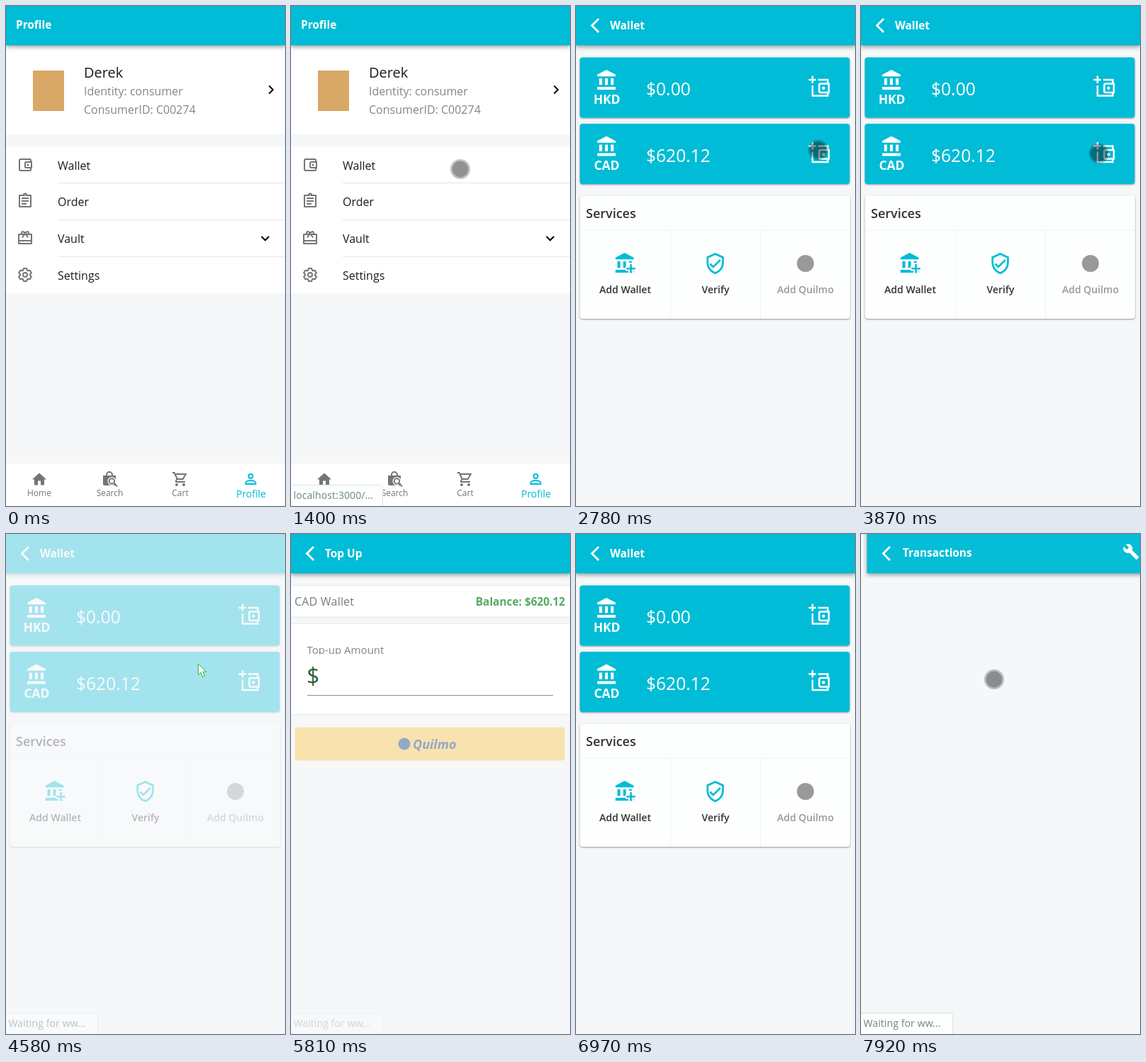
Animation of 394 by 705 pixels, one loop 7.99 s. Source, as an HTML page:

```html
<!DOCTYPE html>
<html lang="en">
<head>
<meta charset="utf-8">
<title>Wallet app</title>
<style>
  html, body { margin: 0; width: 100%; height: 100%; overflow: hidden; background: #f5f7f9; }
  svg { display: block; }
  text { font: 16px "Open Sans", "Noto Sans", sans-serif; }
  .title { font-size: 15.4px; font-weight: 700; fill: #fff; }
  .medium { font-weight: 600; fill: #333; }
  .cell { font-size: 14px; text-anchor: middle; }
  .code { font-size: 17.4px; font-weight: 700; text-anchor: middle; }
  .amount { font-size: 24.6px; }
  .tab { font-size: 12px; text-anchor: middle; }
  .bar { fill: #00bcd6; filter: drop-shadow(0 2px 3px rgba(0, 0, 0, .4)); }
  .card { filter: drop-shadow(0 1px 1px rgba(0, 0, 0, .4)); }
  .line { fill: none; stroke: currentColor; stroke-width: 2; }
  .rule { fill: none; stroke: #e4e6e8; }
  .panel { fill: #fff; stroke: #e6e9eb; }
</style>
</head>
<body>
<svg width="394" height="705">
  <defs>
    <rect id="bar" class="bar" x="-.5" y="-10" width="395" height="65.5"/>
    <g id="backBar">
      <use href="#bar"/>
      <path d="M32 18 22.5 27.5 32 37" fill="none" stroke="#fff" stroke-width="2.8"/>
    </g>
    <path id="bank" d="M4 10v7h3v-7zm6 0v7h3v-7zM2 22h19v-3H2zm14-12v7h3v-7zm-4.5-9L2 6v2h19V6z"/>
    <g id="currency" color="#fff">
      <rect class="card" x="5.5" y="72.5" width="381" height="85" rx="4" fill="#00bcd6"/>
      <use href="#bank" transform="translate(27.3 88.7) scale(1.36 1.33)" fill="#fff"/>
      <path class="line" style="stroke-width:2.5" d="M328.500 104h10.500m-5-5.500v10.500m8-5h13.500v5M334 112v14.500h21.500v-4M345.500 109.500h11.500v12.500h-11.500q-2 0-2-2v-8.500q0-2 2-2z"/>
      <circle cx="349.5" cy="115.800" r="2.200" fill="#fff"/>
    </g>
  </defs>

  <g id="profile">
    <rect y="50" width="394" height="131" fill="#fff"/>
    <rect y="198" width="394" height="207" fill="#fff"/>
    <use href="#bar"/>
    <text class="title" x="14" y="32">Profile</text>
    <rect x="38" y="91" width="44" height="57" fill="#d9a766"/>
    <text x="110" y="101" style="font-size:20px" fill="#1c1c1c">Derek</text>
    <g fill="#858585">
      <text x="110" y="126">Identity: consumer</text>
      <text x="110" y="152">ConsumerID: C00274</text>
    </g>
    <path d="m371.500 112.500 5.500 5.500-5.500 5.500M360.700 325l5.300 5.300 5.300-5.300" class="line"/>
    <path class="rule" d="M73 249.500H394M73 301.500H394M73 353.500H394"/>
    <g fill="#1c1c1c">
      <text x="73" y="231">Wallet</text>
      <text x="73" y="282">Order</text>
      <text x="73" y="334">Vault</text>
      <text x="73" y="386">Settings</text>
    </g>
    <g fill="#757575" color="#757575">
      <g transform="translate(15 212)">
        <path class="line" d="M20 7V5.500Q20 4 18.500 4h-13Q4 4 4 5.500v13Q4 20 5.500 20h13q1.500 0 1.500-1.500V17M13.500 8h7.500v8h-7.500q-1.500 0-1.500-1.500v-5Q12 8 13.500 8z"/>
        <circle cx="16" cy="12" r="1.500"/>
      </g>
      <g transform="translate(15 263)">
        <path class="line" d="M4 4h16v16H4zM7 8h10M7 12h10M7 16h7" stroke-linejoin="round"/>
        <path d="M9 5V3.500a3 3 0 0 1 6 0V5z"/>
        <circle cx="12" cy="3.500" r=".8" fill="#fff"/>
      </g>
      <path class="line" transform="translate(15 315)" stroke-linejoin="round"
        d="M3 7h18v13H3zM3 16h18M7.800 11.500 12 6l4.200 5.500M12 6C11 2.500 7 2.200 7 5q0 2 3 2M12 6c1-3.500 5-3.800 5-1q0 2-3 2"/>
      <g class="line" transform="translate(27 379)">
        <path id="gear" stroke-linejoin="round"/>
        <circle r="3"/>
      </g>
    </g>
    <rect y="645" width="394" height="60" fill="#fff"/>
    <g fill="#757575" color="#757575">
      <path transform="translate(35 655.5)" d="M10 20v-6h4v6h5v-8h3L12 3 2 12h3v8z"/>
      <g transform="translate(134 654)">
        <path d="M3 8h18v14H5q-2 0-2-2z"/>
        <path class="line" d="M8 9V7a4 4 0 0 1 8 0v2"/>
        <circle cx="15.5" cy="16" r="6" fill="#fff"/>
        <path class="line" d="m18 18.500 5 5"/>
        <circle class="line" cx="15.5" cy="16" r="3.700"/>
      </g>
      <g transform="translate(234 655)">
        <path class="line" d="M1 3h2.700l4.100 9h8l4-7H5M7.500 12 6 14.600Q5.500 16 7 16h12"/>
        <circle cx="7" cy="20" r="2"/><circle cx="17" cy="20" r="2"/>
      </g>
      <text class="tab" x="47" y="691">Home</text>
      <text class="tab" x="146.5" y="691">Search</text>
      <text class="tab" x="246" y="691">Cart</text>
    </g>
    <g color="#00bcd6" fill="#00bcd6">
      <g class="line" transform="translate(333.5 655)">
        <circle cx="12" cy="8" r="3"/>
        <path d="M5 19v-2c0-1.500 3.500-3.100 7-3.100s7 1.600 7 3.100v2z"/>
      </g>
      <text class="tab" x="346" y="693" style="font-size:14px">Profile</text>
    </g>
  </g>

  <g id="wallet">
    <use href="#backBar"/>
    <text class="title" x="48" y="32.500">Wallet</text>
    <use href="#currency"/>
    <use href="#currency" y="93.500"/>
    <g fill="#fff">
      <text class="code" x="43.500" y="138">HKD</text>
      <text class="code" x="43.500" y="231">CAD</text>
      <text class="amount" x="99" y="126">$0.00</text>
      <text class="amount" x="99" y="220">$620.12</text>
    </g>
    <rect class="card" x="5.5" y="267.5" width="381.5" height="173.5" rx="4" fill="#fdfefe"/>
    <path class="rule" d="M5 316H387M133.500 316V441M260.500 316V441" style="stroke:#eff2f4"/>
    <text class="medium" x="14" y="299" style="font-size:18px">Services</text>
    <g fill="#00bcd6" color="#00bcd6">
      <use href="#bank" transform="translate(53 346.7) scale(1.36 1.33)"/>
      <path d="M77.500 362v15M70 370h15" stroke="#fdfefe" stroke-width="7"/>
      <path d="M77.500 364v12.500M71.300 370.300h12.500" stroke="currentColor" stroke-width="2.600"/>
      <path class="line" transform="translate(180.3 346.7) scale(1.36)"
        d="M12 2.100 4 5.650V11c0 5 3.400 9.700 8 10.970 4.600-1.270 8-5.970 8-10.970V5.650zM6.700 12.300l3.300 3.300 7.300-7.300"/>
    </g>
    <circle cx="324" cy="363" r="12" fill="#999"/>
    <text class="medium cell" x="69.5" y="405">Add Wallet</text>
    <text class="medium cell" x="197" y="405">Verify</text>
    <text class="medium cell" x="324" y="405" style="fill:#999">Add Quilmo</text>
  </g>

  <g id="topUp">
    <use href="#backBar"/>
    <text class="title" x="48" y="32.500">Top Up</text>
    <rect class="panel" x="-1" y="72.5" width="396" height="44.5"/>
    <text x="5" y="101" fill="#737d7e" letter-spacing=".2">CAD Wallet</text>
    <text class="title" x="387" y="101" text-anchor="end" style="fill:#57aa60">Balance: $620.12</text>
    <rect class="panel" x="-1" y="126.5" width="396" height="128"/>
    <text x="22.500" y="169" fill="#7f8788" style="font-size:15px">Top-up Amount</text>
    <rect x="20" y="169.5" width="120" height="7" fill="#fff"/>
    <text x="22" y="212" fill="#2f6135" style="font-size:32px">$</text>
    <path d="M23 227.500H370" stroke="#8c8c8c"/>
    <g id="pay">
      <rect x="5.5" y="272.5" width="381" height="47" rx="4" fill="#f8e3af"/>
      <g fill="#92a8c8">
        <circle cx="160" cy="296" r="8.500"/>
        <text x="172" y="303" style="font-size:18px;font-weight:700;font-style:italic">Quilmo</text>
      </g>
    </g>
  </g>

  <g id="transactions">
    <use href="#backBar"/>
    <text class="title" x="50" y="32">Transactions</text>
    <path fill="#fff" transform="translate(360.5 13)" d="M22.700 19l-9.100-9.100c.9-2.300.4-5-1.500-6.900-2-2-5-2.400-7.400-1.300L9 6 6 9 1.600 4.700C.4 7.100.9 10.100 2.900 12.100c1.900 1.900 4.600 2.400 6.900 1.500l9.100 9.100c.4.4 1 .4 1.400 0l2.300-2.300c.5-.4.5-1.100.1-1.400z"/>
  </g>

  <g id="status">
    <path d="M-1 675.500H126q3.500 0 3.500 3.500V706H-1z" fill="#fdfefe" stroke="#dfe2e4"/>
    <text id="statusText" x="3.500" y="695" fill="#6f8387" style="font-size:14px" letter-spacing=".1"></text>
  </g>

  <g id="cursor">
    <g id="touch">
      <circle r="12.700" fill="none" stroke="#000" stroke-opacity=".24" stroke-width="2.600"/>
      <circle r="11.400" fill-opacity=".43"/>
    </g>
    <path id="arrow" d="M0 0V15.500L3.600 12.200 6.200 18.500 9 17.300 6.400 11.300H11z" fill="#fff" stroke="#2fb52f"/>
  </g>
</svg>
<script>
  const LOOP = 7990, WIDTH = 394;
  const $ = id => document.getElementById(id);
  const clamp = v => Math.min(1, Math.max(0, v));
  const ramp = (t, from, to) => clamp((t - from) / (to - from));

  // Six teeth, four corners each
  const corners = [];
  for (let tooth = 0; tooth < 6; tooth++)
    for (const [offset, radius] of [[-26, 6.9], [-13, 9.3], [13, 9.3], [26, 6.9]]) {
      const angle = (tooth * 60 + offset) * Math.PI / 180;
      corners.push([radius * Math.sin(angle), radius * Math.cos(angle)]);
    }
  $("gear").setAttribute("d", "M" + corners.join("L") + "z");

  // Pages slide in from the right and fade out in place
  const visits = [
    { page: "profile", enter: [-2, -1], exit: [1430, 1580] },
    { page: "wallet", enter: [1590, 1860], exit: [4440, 4650] },
    { page: "topUp", enter: [4770, 4975], exit: [6510, 6660] },
    { page: "wallet", enter: [6680, 6970], exit: [7600, 7710] },
    { page: "transactions", enter: [7710, 8004], exit: [8100, 8200] },
  ];

  const messages = [
    { text: "localhost:3000/...", show: [1350, 1400], hide: [2010, 2320] },
    { text: "Waiting for ww...", show: [4510, 4670], hide: [5580, 5900] },
    { text: "Waiting for ww...", show: [7590, 7600], hide: [8100, 8200] },
  ];

  // Each run is a list of [time, x, y]
  const cursorRuns = [
    [[70, 325, 719], [300, 258, 545], [1200, 258, 545], [1400, 239, 230], [1980, 239, 230],
     [2480, 349, 206], [2690, 349, 206], [2780, 342, 203], [3300, 342, 203], [3600, 256, 205],
     [3870, 336, 208], [4000, 336, 208], [4250, 271.5, 183], [5200, 271.5, 183]],
    [[5840, 227, -14], [5980, 27, 26], [6510, 27, 26]],
    [[7600, 188, 205], [LOOP, 188, 205]],
  ];

  function place(el, x, y, opacity) {
    el.setAttribute("transform", `translate(${x} ${y})`);
    el.style.opacity = opacity;
    el.style.display = opacity > 0 ? "" : "none";
  }

  function drawCursor(t) {
    const run = cursorRuns.find(r => t >= r[0][0] && t < r[r.length - 1][0]);
    if (!run) return place($("cursor"), 0, 0, 0);
    const next = run.findIndex(key => key[0] > t);
    const [t0, x0, y0] = run[next - 1], [t1, x1, y1] = run[next];
    const p = ramp(t, t0, t1);
    place($("cursor"), x0 + (x1 - x0) * p, y0 + (y1 - y0) * p, 1);
    const isArrow = t >= 4250 && t < 5200;
    $("arrow").style.display = isArrow ? "" : "none";
    $("touch").style.display = isArrow ? "none" : "";
  }

  function draw(t) {
    for (const { page } of visits) place($(page), 0, 0, 0);
    for (const { page, enter, exit } of visits) {
      if (t < enter[0] || t >= exit[1]) continue;
      const remaining = (1 - ramp(t, ...enter)) ** 3;
      place($(page), WIDTH * remaining, 0, (1 - remaining) * (1 - ramp(t, ...exit)));
    }
    $("pay").style.opacity = ramp(t, 5130, 5270);

    const message = messages.find(m => t >= m.show[0] && t < m.hide[1]);
    if (message) $("statusText").textContent = message.text;
    place($("status"), 0, 0, message ? ramp(t, ...message.show) * (1 - ramp(t, ...message.hide)) : 0);
    drawCursor(t);
  }

  const start = performance.now();
  function tick() {
    draw((performance.now() - start) % LOOP);
    requestAnimationFrame(tick);
  }
  tick();
</script>
</body>
</html>
```
